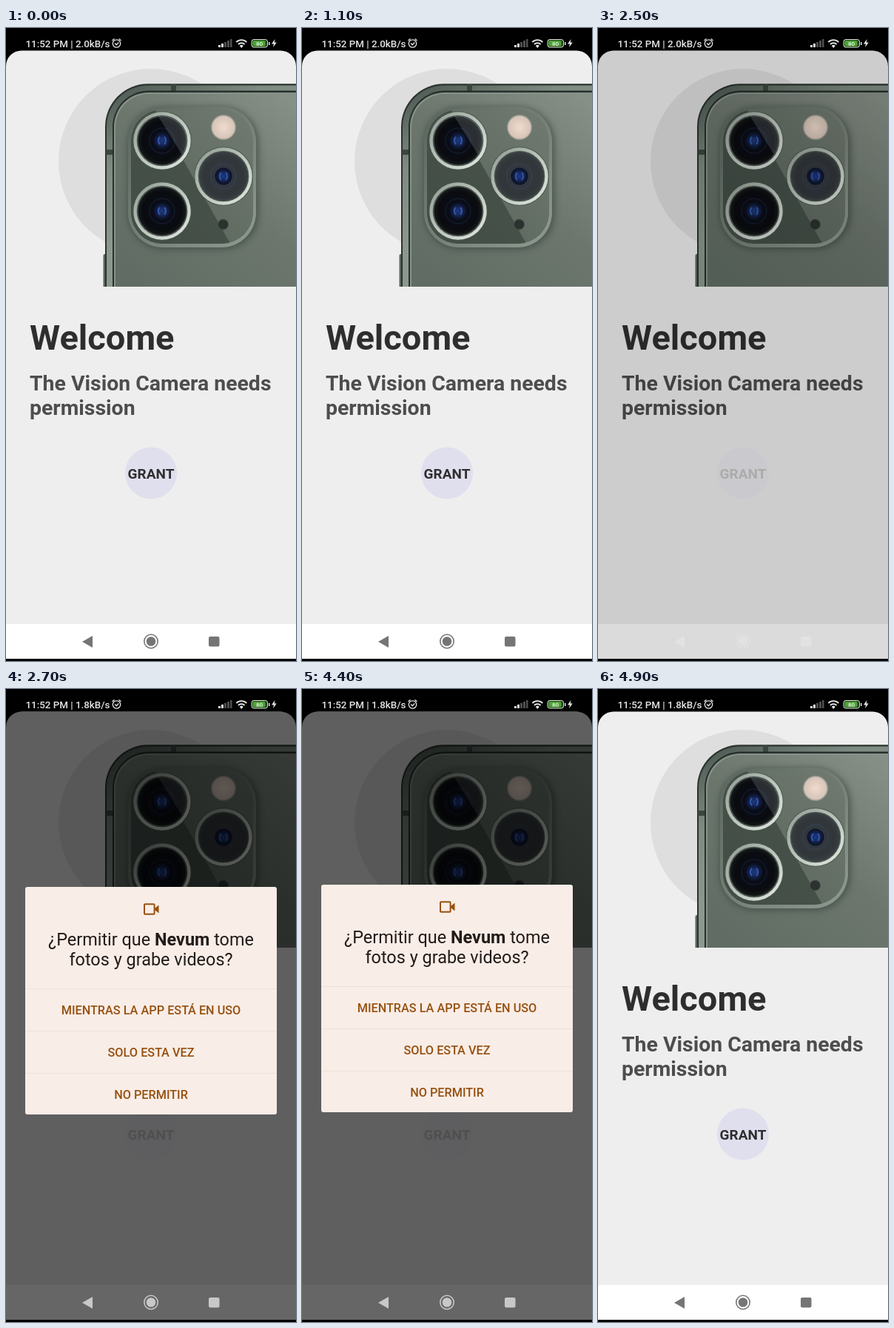
Animation of 392x854 px, one loop 5 s. Source, as an HTML page:

```html
<!DOCTYPE html>
<html lang="es">
<head>
<meta charset="utf-8">
<title>Permission prompt</title>
<style>
html, body { margin: 0; width: 100%; height: 100%; overflow: hidden; background: #000; }
svg { display: block; font-family: Roboto, sans-serif; }
.mid { text-anchor: middle; }
.bold { font-weight: 700; }
.option { font-size: 16.25px; font-weight: 500; fill: #96500f; text-anchor: middle; }
</style>
</head>
<body>
<svg width="392" height="854" viewBox="0 0 392 854">
  <defs>
    <linearGradient id="body" x1="190" y1="349" x2="392" y2="100" gradientUnits="userSpaceOnUse">
      <stop offset="0" stop-color="#616d64"/><stop offset=".5" stop-color="#6c766d"/><stop offset="1" stop-color="#879087"/>
    </linearGradient>
    <linearGradient id="metal" x1="140" y1="80" x2="230" y2="250" gradientUnits="userSpaceOnUse">
      <stop offset="0" stop-color="#4a564f"/><stop offset=".5" stop-color="#7e8b82"/><stop offset="1" stop-color="#8c988e"/>
    </linearGradient>
    <linearGradient id="edge" x1="0" y1="0" x2="1" y2="1">
      <stop offset="0" stop-color="#5a655d"/><stop offset="1" stop-color="#8f9a90"/>
    </linearGradient>
    <linearGradient id="glass" x1="0" y1="1" x2="1" y2="0">
      <stop offset="0" stop-color="#556057"/><stop offset="1" stop-color="#717b71"/>
    </linearGradient>
    <linearGradient id="ring" x1="0" y1="0" x2="1" y2="1">
      <stop offset="0" stop-color="#8d9a91"/><stop offset=".5" stop-color="#bcc6bd"/><stop offset="1" stop-color="#e2e9e2"/>
    </linearGradient>
    <radialGradient id="lensFill">
      <stop offset="0" stop-color="#1d3c86"/><stop offset=".2" stop-color="#14234f"/>
      <stop offset=".38" stop-color="#0a0d18"/><stop offset=".8" stop-color="#090b0e"/><stop offset="1" stop-color="#15191a"/>
    </radialGradient>
    <radialGradient id="flash">
      <stop offset="0" stop-color="#efdccc"/><stop offset="1" stop-color="#d6c3b8"/>
    </radialGradient>
    <filter id="soft" x="-20%" y="-20%" width="140%" height="140%"><feGaussianBlur stdDeviation="4"/></filter>
    <clipPath id="photo"><rect x="128" y="60" width="264" height="289"/></clipPath>
    <clipPath id="bump"><rect x="169" y="110" width="165" height="181" rx="42"/></clipPath>
    <g id="lens">
      <circle r="40" fill="#4a554d" opacity=".6"/>
      <circle r="38.7" fill="url(#ring)"/>
      <circle r="34.3" fill="#4a524d"/>
      <circle r="32.5" fill="url(#lensFill)"/>
      <circle r="17" fill="none" stroke="#1a2236"/>
      <path d="M-3-5a7 7 0 0 0 0 10M3-5a7 7 0 0 1 0 10" fill="none" stroke="#3557aa" stroke-width="2"/>
    </g>
  </defs>

  <rect width="392" height="854"/>
  <path d="M0 851V51.4a21 21 0 0 1 21-21H371a21 21 0 0 1 21 21V851Z" fill="#eee"/>
  <circle cx="196" cy="180" r="125" fill="#dedede"/>

  <g clip-path="url(#photo)">
    <rect x="131.5" y="305" width="5" height="60" rx="2" fill="#59655d"/>
    <rect x="134" y="75.3" width="400" height="500" rx="58" fill="#2a332e"/>
    <rect x="136" y="77.5" width="400" height="500" rx="56" fill="url(#metal)"/>
    <path d="M135 164h10v7h-10zM223 76h7v10h-7z" fill="#3b4640"/>
    <rect x="144" y="84.5" width="400" height="500" rx="49" fill="#27302c"/>
    <rect x="146" y="87" width="400" height="500" rx="46.5" fill="#87938a"/>
    <rect x="148" y="89" width="400" height="500" rx="45" fill="url(#body)"/>
    <rect x="164" y="106" width="178" height="193" rx="49" fill="#39433d" opacity=".6" filter="url(#soft)"/>
    <rect x="165" y="106" width="173" height="190" rx="47" fill="url(#edge)"/>
    <g clip-path="url(#bump)">
      <rect x="165" y="106" width="173" height="190" fill="url(#glass)"/>
      <path d="M165 106H199L306 296H165Z" fill="#3d4740" opacity=".75"/>
    </g>
    <use href="#lens" x="211" y="152"/>
    <path d="M206 119.5A32.5 32.5 0 0 1 238 171Z" fill="#aeb7bd" opacity=".2"/>
    <use href="#lens" x="294" y="200"/>
    <circle cx="294" cy="200" r="22" fill="none" stroke="#626a70" stroke-width="21" opacity=".45"/>
    <use href="#lens" x="211" y="247"/>
    <circle cx="294" cy="134" r="17" fill="#9b9c94"/>
    <circle cx="294" cy="134" r="15.5" fill="url(#flash)"/>
    <circle cx="293.5" cy="265" r="7" fill="#2c322f" stroke="#48524b"/>
  </g>

  <g class="bold">
    <text x="32" y="434" font-size="47" fill="#2e2e2e">Welcome</text>
    <g font-size="28.42" fill="#4d4d4d">
      <text x="32" y="489">The Vision Camera needs</text>
      <text x="32" y="522">permission</text>
    </g>
    <g id="grant">
      <circle cx="196" cy="600.5" r="35" fill="#e0dfee"/>
      <text class="mid" x="196" y="608" font-size="19" fill="#2e2e2e">GRANT</text>
    </g>
  </g>

  <rect y="804" width="392" height="47" fill="#fff"/>
  <rect id="dim" y="30.4" width="392" height="820.6"/>
  <g id="nav">
    <path d="M103 828 117 820V836Z"/>
    <circle cx="196" cy="827.5" r="9.2" fill="none" stroke="currentColor" stroke-width="1.6"/>
    <circle cx="196" cy="827.5" r="6.3"/>
    <rect x="274" y="821" width="14.5" height="13.5" rx="2"/>
  </g>

  <g id="dialog">
    <rect x="26" y="264" width="340" height="307" rx="3" fill="#f9ede7"/>
    <path d="M26 401.5H366M26 458.5H366M26 515.5H366" stroke="#eee1da"/>
    <rect x="187" y="287.2" width="13.6" height="13.6" rx="1" fill="none" stroke="#96500f" stroke-width="2"/>
    <path d="M201 293 206.5 288.5V299.5L201 295Z" fill="#96500f"/>
    <g class="mid" font-size="23.45" fill="#221b18">
      <text x="196" y="343">¿Permitir que <tspan class="bold">Nevum</tspan> tome</text>
      <text x="196" y="370">fotos y grabe videos?</text>
    </g>
    <text class="option" x="196" y="435.5">MIENTRAS LA APP ESTÁ EN USO</text>
    <text class="option" x="196" y="492.5">SOLO ESTA VEZ</text>
    <text class="option" x="196" y="549.5">NO PERMITIR</text>
  </g>

  <g fill="#e6e6e6">
    <text id="status" x="26.5" y="25.5" font-size="13.35" font-weight="500"></text>
    <g fill="none" stroke="#e6e6e6" stroke-width="1.3">
      <circle cx="149.5" cy="21" r="5.2"/>
      <path d="M147 20.5 149.3 22.8 152.3 19.5M143.5 17 146.5 14.5M155.5 17 152.5 14.5"/>
      <path d="M311.3 19a10 10 0 0 1 14 0M314 22a6.2 6.2 0 0 1 8.6 0" stroke-width="1.9"/>
    </g>
    <path d="M315.8 24a3.6 3.6 0 0 1 5 0L318.3 27Z"/>
    <path d="M287 23h3v3h-3zM291 21h3v5h-3z"/>
    <path d="M295 19h3v7h-3zM299 17h3v9h-3zM303 15h2.5v11h-2.5z" opacity=".35"/>
    <rect x="332" y="15.5" width="21.5" height="10.5" rx="3" fill="#1f3d18" stroke="#dcebd8"/>
    <rect x="333.5" y="17" width="17" height="7.5" rx="1.5" fill="#4da436"/>
    <path d="M355 19h1.5v4H355z"/>
    <text class="mid bold" x="342.5" y="23.8" font-size="8" fill="#d9efd2">80</text>
    <path d="M363.5 15 359 21.5H362L361 26 365.8 19.5H362.8Z"/>
  </g>
</svg>
<script>
const LOOP = 5000, STEP = 100;
const el = id => document.getElementById(id);
const [grant, dim, nav, dialog, status] = ['grant', 'dim', 'nav', 'dialog', 'status'].map(el);

// Piecewise linear value through [time, value] keys
function track(...keys) {
  return t => {
    const i = keys.findIndex(k => k[0] > t);
    if (i === 0) return keys[0][1];
    if (i < 0) return keys[keys.length - 1][1];
    const [t0, a] = keys[i - 1], [t1, b] = keys[i];
    return a + (b - a) * (t - t0) / (t1 - t0);
  };
}

const shade = track([2400, 0], [2500, .14], [2600, .42], [2700, .6], [4500, .6], [4600, .54], [4700, .22], [4800, .02], [4900, 0]);
const press = track([2200, 1], [2300, .7], [2400, .2], [4500, .2], [4600, .3], [4700, .6], [4800, .95], [4900, 1]);
const icons = track([2400, 117], [2500, 226], [2700, 200], [4500, 200], [4600, 178], [4700, 165], [4900, 117]);
const fade = track([2500, 0], [2600, .7], [2700, 1], [4500, 1], [4600, .71], [4700, .2], [4800, 0]);
const slide = track([2500, 40], [2600, 16], [2700, 3], [2800, 1], [3000, 0]);

const start = performance.now();
function draw(now) {
  const elapsed = Math.max(0, now - start) % LOOP;
  const t = Math.floor(elapsed / STEP) * STEP; // screen refreshes ten times a second
  const grey = Math.round(icons(t));
  dim.style.opacity = shade(t);
  grant.style.opacity = press(t);
  nav.style.color = nav.style.fill = `rgb(${grey},${grey},${grey})`;
  dialog.style.opacity = fade(t);
  dialog.setAttribute('transform', `translate(0 ${slide(t)})`);
  status.textContent = `11:52 PM | ${t < 2600 ? '2.0' : '1.8'}kB/s`;
  requestAnimationFrame(draw);
}
draw(start);
</script>
</body>
</html>
```
